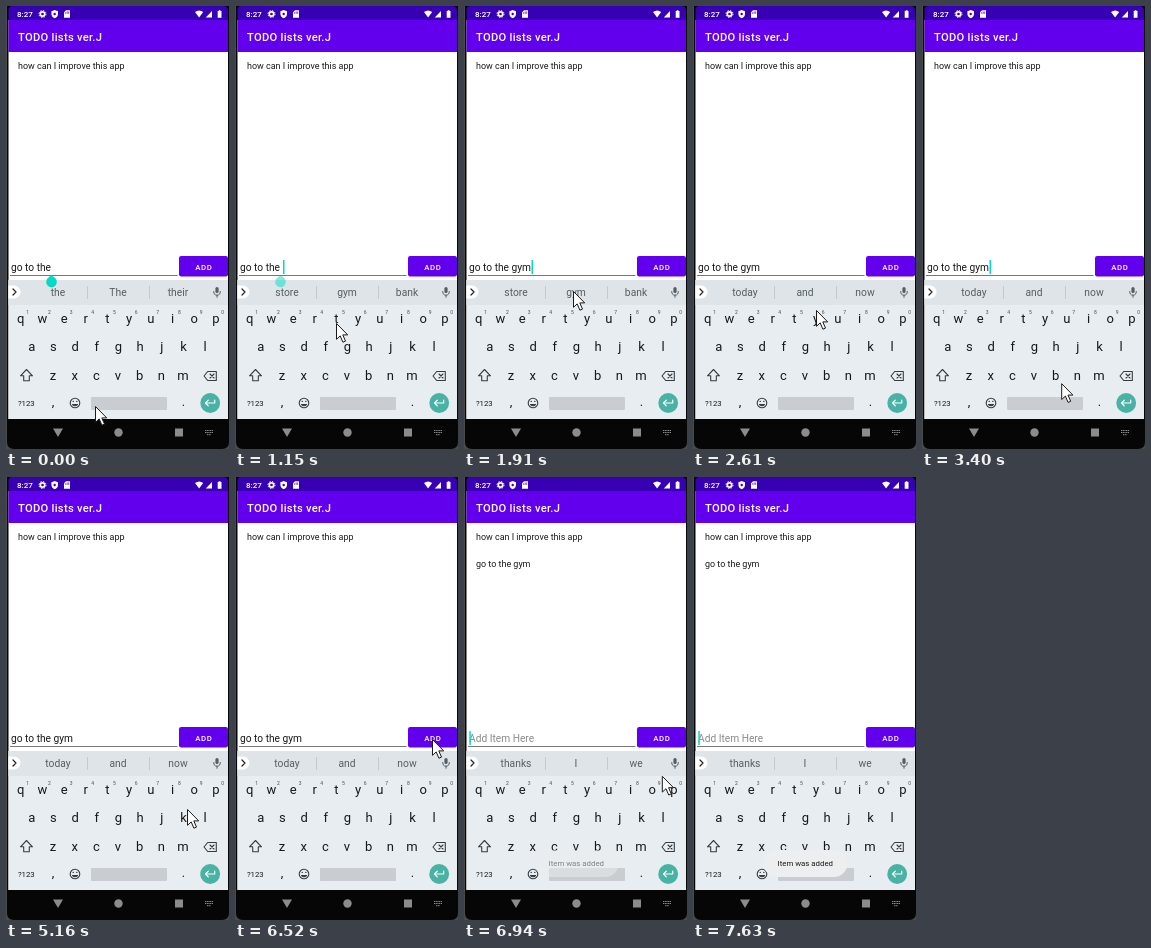
Write an HTML page that moves like this. It is 223 px wide and 443 px high and loops after 8 s.

```html
<!DOCTYPE html>
<html lang="en">
<head>
<meta charset="utf-8">
<title>TODO lists</title>
<style>
  html, body { margin: 0; width: 100%; height: 100%; overflow: hidden; background: #000; }
  svg { display: block; width: 223px; height: 443px; font-family: Roboto, Arial, sans-serif; }
  .mid { text-anchor: middle; }
  .line { fill: none; stroke-linecap: round; stroke-linejoin: round; }
</style>
</head>
<body>
<svg viewBox="0 0 223 443">
  <rect width="223" height="443" fill="#4a4a4a"/>
  <path d="M1 0H223V436q0 7-7 7H8q-7 0-7-7z" fill="#060606"/>
  <rect x="2.5" y="14" width="219.5" height="399" fill="#fff"/>
  <path d="M2.500 14V4q0-4 4-4H217q5 0 5 5v9z" fill="#3700b3"/>
  <rect x="2.5" y="14" width="219.5" height="32" fill="#6200ee"/>

  <g fill="#fff">
    <text x="11" y="11" font-size="8" font-weight="500">8:27</text>
    <circle cx="36.5" cy="8" r="2.2" fill="none" stroke="#fff" stroke-width="1.7"/>
    <circle cx="36.5" cy="8" r="3.5" fill="none" stroke="#fff" stroke-width="1" stroke-dasharray="1.4 1.35"/>
    <path d="M48.700 4l3.300 1.300v2.600q0 2.900-3.300 4.300q-3.300-1.400-3.300-4.300V5.300z"/>
    <circle cx="48.700" cy="8" r="1.2" fill="#3700b3"/>
    <path d="M60 4.300h4v7.500h-6V6.300z"/>
    <path d="M59.700 6.200v1.600M61.200 5.500v2.300M62.700 5.500v2.300" stroke="#3700b3" stroke-width=".7"/>
    <path d="M189 6q4.100-3.200 8.200 0L193.100 11.500z"/>
    <path d="M199.800 11.500h6.200V5z"/>
    <path d="M211.700 5h1V4.200h1.800V5h1v6.700h-3.800z"/>
    <text x="12" y="35" font-size="11.200" font-weight="500" letter-spacing=".28">TODO lists ver.J</text>
  </g>

  <g font-size="8.960" fill="#1a1a1a">
    <text x="12" y="63">how can I improve this app</text>
    <text id="added" x="12" y="90">go to the gym</text>
  </g>

  <text id="field" x="5" y="265" font-size="10.200"></text>
  <path d="M4 269.500H171.500" stroke="#777" stroke-width="1"/>
  <rect id="caret" y="254" width="1.500" height="14" fill="#03dac5"/>
  <rect x="173" y="250" width="49" height="20.500" rx="2.200" fill="#6200ee"/>
  <rect id="ripple" x="173" y="250" width="49" height="20.500" rx="2.200" fill="#fff" opacity=".18"/>
  <text x="197.900" y="263.500" font-size="7.840" font-weight="500" letter-spacing=".7" class="mid" fill="#fff">ADD</text>

  <rect x="2.500" y="274" width="219.500" height="139" fill="#e8edf1"/>
  <rect x="2.500" y="274" width="219.500" height="25" fill="#dfe4e8"/>
  <path d="M2.500 279.500H8a6.500 6.500 0 0 1 0 13H2.500z" fill="#fff"/>
  <path d="M7 283l3 3l-3 3" class="line" stroke="#222" stroke-width="1.200"/>
  <path d="M81.500 280v13M143.500 280v13" stroke="#c4c9cd" stroke-width="1"/>
  <g id="hints" class="mid" font-size="10.300" fill="#555e64"></g>
  <rect x="209.400" y="281" width="3.200" height="6" rx="1.600" fill="#555e64"/>
  <path d="M207.700 285.500q0 3.700 3.300 3.700t3.300-3.700M211 289.300v2" class="line" stroke="#555e64" stroke-width="1"/>

  <g id="keys" class="mid" font-size="13" fill="#15191c"></g>
  <g class="line" stroke="#353c41" stroke-width="1.100">
    <path d="M20.500 363.500l6 6.300h-3.200v5h-5.600v-5h-3.200z"/>
    <path d="M198 370l3.700-4.500h8.600v9h-8.600z"/>
    <path d="M204 368l4 4m0-4l-4 4"/>
    <circle cx="69" cy="397" r="4.800"/>
    <path d="M66.500 398.500q2.500 2.500 5 0z"/>
  </g>
  <path d="M67.200 395.400h.1M70.800 395.400h.1" class="line" stroke="#353c41" stroke-width="1.400"/>
  <rect x="85" y="391" width="76" height="13" rx="1" fill="#c9cdd1"/>
  <circle cx="204.200" cy="397" r="9.900" fill="#48b2a5"/>
  <path d="M208.700 394v3h-9M202.300 394.200l-2.800 2.800l2.800 2.800" class="line" stroke="#fff" stroke-width="1.200"/>

  <g fill="#8c8c8c">
    <path d="M47 422.500h10l-5 8.500z"/>
    <circle cx="112.500" cy="426.500" r="4.200"/>
    <rect x="169" y="422.500" width="8" height="8"/>
    <path d="M199 424.500h8M199 426.500h8M201 428.700h4" stroke="#8c8c8c" stroke-width="1" stroke-dasharray="1.200 .5"/>
  </g>

  <path id="handle" d="M45.500 269l3.800 3.300a5.300 5.300 0 1 1-7.600 0z" fill="#03dac5"/>
  <g id="toast">
    <rect x="70.500" y="373" width="84" height="27" rx="13.500" fill="#eceef0"/>
    <text x="112.300" y="389" font-size="7.840" class="mid" fill="#1a1a1a">Item was added</text>
  </g>
  <path id="pointer" d="M.5.500V16.300l3.700-3.400l2.700 6.300l2.600-1.100l-2.700-6.200h4.900z" fill="#fff" stroke="#1a1a1a" stroke-width="1" stroke-linejoin="round"/>
</svg>
<script>
const LOOP = 8000;
const $ = id => document.getElementById(id);
const label = (x, y, text, extra = '') => `<text x="${x}" y="${y}" ${extra}>${text}</text>`;
const show = (id, on) => $(id).setAttribute('visibility', on ? 'visible' : 'hidden');
const fade = (t, from, to) => Math.min(1, Math.max(0, (t - from) / (to - from)));

const rows = [['qwertyuiop', 14.8, 317], ['asdfghjkl', 25.8, 345], ['zxcvbnm', 47, 373.5]];
const pitch = 21.67;
$('keys').innerHTML = rows.map(([letters, x, y]) =>
  [...letters].map((c, i) => label(x + i * pitch, y, c)).join('')).join('')
  + [...'1234567890'].map((c, i) => label(21.7 + i * pitch, 308, c, 'font-size="5" fill="#444c52"')).join('')
  + label(20.3, 400, '?123', 'font-size="7.8"') + label(47, 400, ',') + label(177.5, 400, '.');

// start, end, number of jumps, destination x and y
const moves = [
  [150, 420, 3, 112, 394],
  [850, 1150, 3, 101, 317],
  [1270, 1540, 3, 109, 285],
  [2460, 2610, 2, 123, 304],
  [3100, 3640, 5, 150, 426],
  [4290, 4440, 2, 178, 380],
  [4560, 5160, 5, 181, 332],
  [5280, 5280, 1, 198, 281],
  [5400, 5400, 1, 197, 262],
  [6880, 7360, 5, 201, 446]
];

function pointerAt(t) {
  let x = 89, y = 400;
  for (const [start, end, jumps, toX, toY] of moves) {
    if (t < start) break;
    const gap = (end - start) / (jumps - 1 || 1) || 1;
    const part = Math.min(jumps, Math.floor((t - start) / gap + 1e-6) + 1) / jumps;
    x += (toX - x) * part;
    y += (toY - y) * part;
  }
  return [x, y];
}

const hintStates = [
  [0, 'the The their'],
  [850, 'store gym bank'],
  [2060, 'today and now'],
  [6760, 'thanks I we']
];
const caretStates = [
  [700, 48], [1660, 0], [1910, 67.5], [2460, 0], [2980, 67.5], [3480, 0],
  [3760, 67.5], [4290, 0], [4800, 67.5], [5160, 0], [5280, 67.5], [5400, 0],
  [6640, 5.3], [7120, 0], [7630, 5.3]
];
const stateAt = (states, t, value) => {
  for (const [start, next] of states) if (t >= start) value = next;
  return value;
};

let shownHints;
function render(t) {
  const hints = stateAt(hintStates, t);
  if (hints !== shownHints) {
    $('hints').innerHTML = hints.split(' ').map((word, i) => label(52 + i * 60, 290, word)).join('');
    shownHints = hints;
  }

  const cleared = t >= 6640;
  $('field').textContent = cleared ? 'Add Item Here' : t < 1910 ? 'go to the' : 'go to the gym';
  $('field').setAttribute('fill', cleared ? '#8a8a8a' : '#1a1a1a');
  show('added', cleared);
  show('ripple', t >= 6640 && t < 6880);

  const caret = stateAt(caretStates, t, 0);
  show('caret', caret > 0);
  $('caret').setAttribute('x', caret);

  $('handle').setAttribute('opacity', 1 - fade(t, 1000, 1300));
  $('toast').setAttribute('opacity', fade(t, 6760, 7120));
  $('pointer').setAttribute('transform', `translate(${pointerAt(t)})`);
}

const begin = performance.now();
function tick() {
  render((performance.now() - begin) % LOOP);
  requestAnimationFrame(tick);
}
tick();
</script>
</body>
</html>
```
